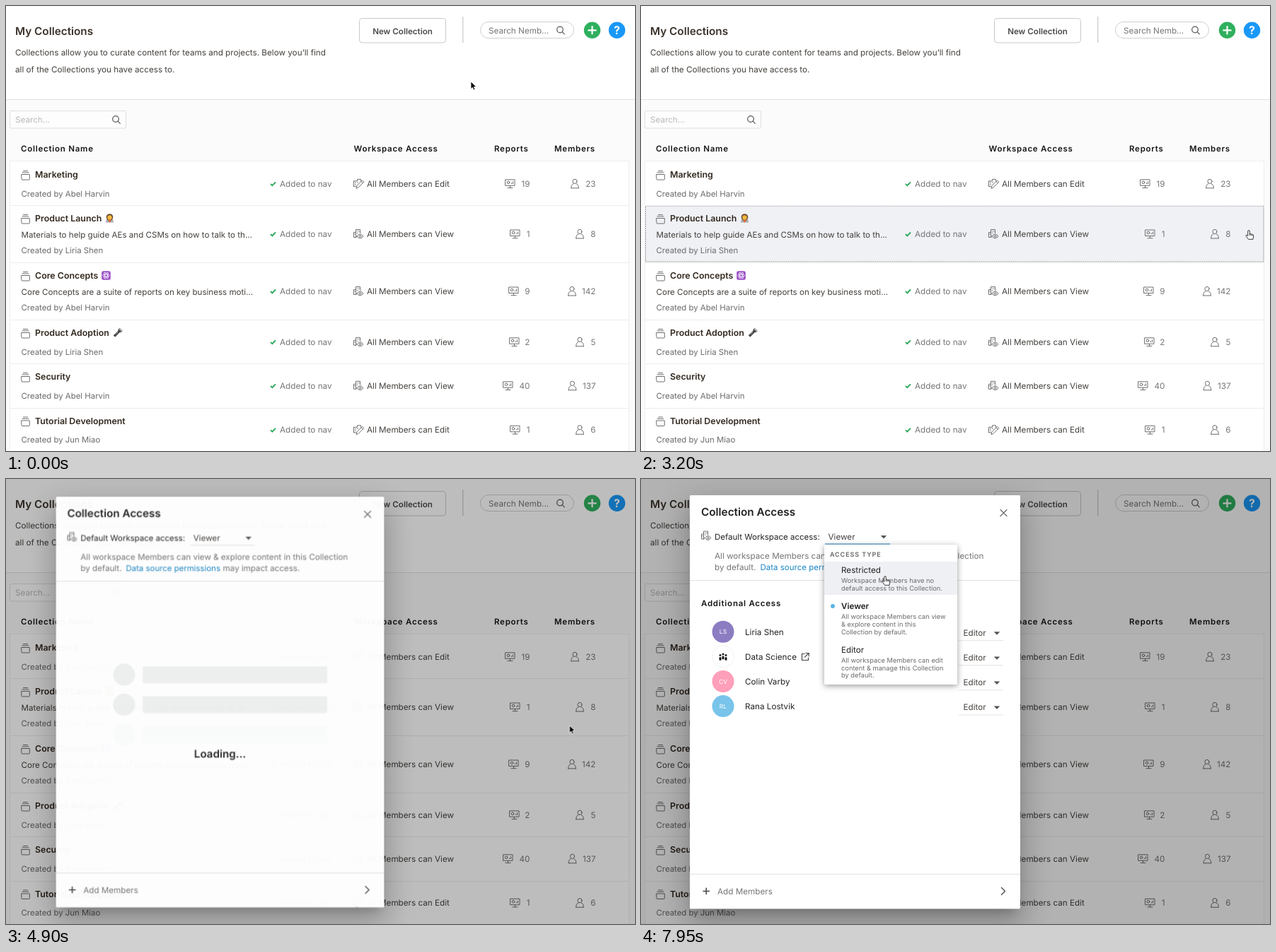
Recreate the animation shown at these times as an HTML page. Size 889 by 630 pixels, loop 8000 ms.

```html
<!DOCTYPE html>
<html lang="en">
<head>
<meta charset="utf-8">
<title>My Collections</title>
<style>
html, body { margin: 0; width: 100%; height: 100%; overflow: hidden; background: #fff; }
svg { display: block; width: 100vw; height: 100vh; }
text { font: 11.7px Inter, "Open Sans", sans-serif; fill: #45413d; text-rendering: geometricPrecision; }
.h1 { font-size: 15.3px; font-weight: 600; fill: #3b332b; }
.title { font-size: 12.4px; font-weight: 600; fill: #33291f; }
.head { font-size: 11.5px; font-weight: 600; letter-spacing: .75px; fill: #151515; }
.btn { font-size: 11.6px; font-weight: 600; fill: #4a4a4a; }
.by { font-size: 11.4px; fill: #6b6b6b; }
.sum { font-size: 11.6px; }
.grey { fill: #757575; }
.soft { fill: #b9b9b9; }
.dark { fill: #222; }
.link { font-size: 11.5px; fill: #1b87c4; }
.note { font-size: 9.3px; fill: #6b6b6b; }
.mid { text-anchor: middle; }
.end { text-anchor: end; }
.line { fill: none; stroke: #6e6e6e; stroke-width: 1; stroke-linecap: round; stroke-linejoin: round; }
.rule { stroke: #e2e2e2; fill: none; }

#hover, #veil, #modal, #load, #list, #menu, #pick, #arrow, #hand, .bone { animation: 8s step-end infinite; }
#hover { opacity: 0; animation-name: hover; }
@keyframes hover { 38.125% { opacity: 1 } 42.5% { opacity: 0 } }
#veil { opacity: 0; animation-name: veil; }
@keyframes veil { 59.75% { opacity: .015 } 61.25% { opacity: .26 } 61.875% { opacity: .29 } 62.5%, 100% { opacity: .3 } }
#modal { opacity: 0; transform-origin: 302.5px 315.7px; animation-name: modal; }
@keyframes modal {
  59.75% { opacity: .14; transform: scale(.75) }
  61.25% { opacity: .97; transform: scale(.993) }
  61.875%, 100% { opacity: 1; transform: none }
}
#load { animation-name: load; }
@keyframes load { 64.375%, 100% { opacity: 0 } }
#list { opacity: 0; animation-name: list; }
@keyframes list { 64.375%, 100% { opacity: 1 } }
.b2 { opacity: 0; animation-name: bone2; }
@keyframes bone2 { 61.25%, 100% { opacity: 1 } }
.b3 { opacity: 0; animation-name: bone3; }
@keyframes bone3 { 61.25% { opacity: .25 } 61.875% { opacity: .6 } 62.5%, 100% { opacity: 1 } }
#menu { opacity: 0; animation-name: menu; }
@keyframes menu { 91.25% { opacity: .4 } 91.875% { opacity: .8 } 92.5%, 100% { opacity: 1 } }
#pick { opacity: 0; animation-name: pick; }
@keyframes pick { 97.5%, 100% { opacity: 1 } }
#arrow { animation-name: arrow; }
@keyframes arrow { 39.375% { opacity: 0 } 42.5% { opacity: 1 } 88.125%, 100% { opacity: 0 } }
#hand { opacity: 0; animation-name: hand; }
@keyframes hand { 39.375% { opacity: 1 } 42.5% { opacity: 0 } 88.125%, 100% { opacity: 1 } }

/* The pointer advances in 50 ms ticks. */
#pointer { animation: move 8s step-end infinite; }
@keyframes move {
  0% { transform: translate(657px, 107px); animation-timing-function: steps(2) }
  1.5% { transform: translate(656px, 108px) }
  9.375% { transform: translate(656px, 108px); animation-timing-function: steps(14) }
  18.125% { transform: translate(804px, 171px); animation-timing-function: steps(3) }
  20% { transform: translate(818px, 186px); animation-timing-function: steps(17) }
  30.625% { transform: translate(826px, 200px); animation-timing-function: steps(7) }
  35% { transform: translate(842px, 205px) }
  36.875% { transform: translate(842px, 205px); animation-timing-function: steps(5) }
  40% { transform: translate(859px, 318px) }
  41.875% { transform: translate(860px, 321px) }
  46.875% { transform: translate(860px, 321px); animation-timing-function: steps(11) }
  53.75% { transform: translate(796.5px, 349px) }
  71.25% { transform: translate(796.5px, 349px); animation-timing-function: steps(6) }
  75% { transform: translate(649px, 216px); animation-timing-function: steps(2) }
  76.875% { transform: translate(600px, 185px) }
  80% { transform: translate(600px, 185px); animation-timing-function: steps(14) }
  88.75% { transform: translate(322px, 79px) }
  95% { transform: translate(322px, 79px); animation-timing-function: steps(7) }
  99.375%, 100% { transform: translate(345px, 138px) }
}
</style>
</head>
<body>
<svg viewBox="0 0 889 630" xmlns="http://www.w3.org/2000/svg">
  <defs>
    <g id="stack" class="line"><path d="M3.5 .5h6M2 2.8h9M1 5.500h11.300v6.800q0 .7-.7.700H1.700q-.7 0-.7-.7z"/></g>
    <g id="edit" class="line"><path d="M1 11V3.500h5V1h5v2M3 5.500h1M6 5.500h1M3 8h1M1 11h3"/><path d="M4.500 13.500l1-3.500 7.500-7.500 2.300 2.300-7.500 7.500zM11.500 4l2.300 2.300"/></g>
    <g id="view" class="line"><path d="M4.500 12H1V5h3V1h6v5M4 5v7M6 3.500h.5M8 3.500h.5M6 6h.5M2.200 7.500h.4"/><path d="M5.500 10.500q4.500-6 9 0q-4.500 6-9 0z"/><circle cx="10" cy="10.500" r="1.400"/></g>
    <g id="report" class="line"><path d="M1 1h13v8.500H1zM7.500 9.500v3M4 12.700h7M9.500 6.800v-1M11.500 6.800V4"/><circle cx="5" cy="5" r="1.800"/></g>
    <g id="person" class="line"><circle cx="6" cy="4" r="3.100"/><path d="M.7 13.500q0-5.500 3-6M11.300 13.500q0-5.500-3-6M.7 13.500h10.600"/></g>
    <g id="lens" class="line" style="stroke:#555;stroke-width:1.200"><circle r="4.300"/><path d="M3.200 3.200L6.300 6.300"/></g>
    <path id="tick" d="M.5 3l2.300 2.300L7.500 .5" fill="none" stroke="#2aa85a" stroke-width="1.900"/>
    <path id="caret" d="M-4.200-2h8.400L0 2.400z" fill="#555"/>
  </defs>

  <rect width="889" height="630" fill="#fff"/>
  <rect y="132" width="889" height="498" fill="#fbfbfb"/>
  <path class="rule" d="M0 132.500H889"/>
  <text class="h1" x="13" y="40.500">My Collections</text>
  <text x="13" y="70">Collections allow you to curate content for teams and projects. Below you’ll find</text>
  <text x="13" y="93.500">all of the Collections you have access to.</text>
  <rect x="499.500" y="17.500" width="122" height="34.500" rx="4" fill="#fff" stroke="#c9c9c9"/>
  <text class="btn mid" x="560.500" y="39.500">New Collection</text>
  <path d="M645.700 15V52" stroke="#d2d2d2" stroke-width="1.500"/>
  <rect x="670.500" y="22.500" width="132" height="23" rx="11.500" fill="#fff" stroke="#cfcfcf"/>
  <text class="grey" x="682" y="39">Search Nemb...</text>
  <use href="#lens" x="783" y="33.500"/>
  <circle cx="828.500" cy="34.300" r="11.700" fill="#2fb05e"/>
  <path d="M822.500 34.300h12M828.500 28.300v12" stroke="#fff" stroke-width="2.200"/>
  <circle cx="863.500" cy="34.300" r="11.700" fill="#1a98f7"/>
  <text class="mid" x="863.500" y="40" style="font-size:16px;font-weight:700;fill:#fff">?</text>

  <rect x="5.500" y="148.500" width="164" height="24.500" rx="2" fill="#fdfdfd" stroke="#dedede"/>
  <text class="soft" x="13" y="165">Search...</text>
  <use href="#lens" x="155" y="160"/>
  <text class="head" x="21" y="205.500">Collection Name</text>
  <text class="head" x="491.500" y="205.500">Workspace Access</text>
  <text class="head" x="690" y="205.500">Reports</text>
  <text class="head" x="775" y="205.500">Members</text>
  <rect x="5.500" y="219.500" width="875" height="420" fill="#fff" stroke="#eee"/>
  <g id="hover"><rect x="6.500" y="283" width="873.500" height="79" fill="#eff1f5" stroke="#999" stroke-dasharray="2 1"/></g>
  <g id="rows"></g>

  <!-- small picture marks beside the names -->
  <g transform="translate(146.500 300.500)">
    <path d="M-5.500 6q0-6 5.500-6t5.500 6z" fill="#a9adb2"/><circle cy="-1.500" r="4.800" fill="#6b4a35"/>
    <circle cy="-1" r="3.200" fill="#f5b93c"/><path d="M-1.500 2.500h3v3h-3z" fill="#e2683c"/>
  </g>
  <g transform="translate(141.500 381.500)">
    <rect x="-6.300" y="-6.300" width="12.600" height="12.600" rx="2.500" fill="#9b4fc4"/>
    <g fill="none" stroke="#fff" stroke-width=".8"><ellipse rx="4.800" ry="1.800"/><ellipse rx="4.800" ry="1.800" transform="rotate(60)"/><ellipse rx="4.800" ry="1.800" transform="rotate(120)"/></g>
  </g>
  <g transform="translate(158 462.500) rotate(-45)">
    <path d="M-7-1.700H2L4-3H6.500V3H4L2 1.700H-7z" fill="#45474a"/><path d="M4.500-3H6.500V3H4.500z" fill="#a8a8a8"/><path d="M-4-.6H1" stroke="#8c8c8c"/>
  </g>

  <rect id="veil" width="889" height="630" fill="#000"/>

  <g id="modal">
    <!-- layered elevation shadow -->
    <rect x="76" y="41" width="453" height="571.500" style="filter:blur(7.5px);opacity:.2"/>
    <rect x="66" y="44" width="473" height="591.500" style="filter:blur(19px);opacity:.14"/>
    <rect x="61" y="24" width="483" height="601.500" style="filter:blur(23px);opacity:.12"/>
    <rect x="69" y="23" width="467" height="585.500" rx="1.500" fill="#fff"/>
    <text class="h1 dark" x="85" y="52">Collection Access</text>
    <path class="line" style="stroke-width:1.300" d="M508 43.500l9 9M517 43.500l-9 9"/>
    <use href="#view" x="84.500" y="73"/>
    <text class="dark" x="104" y="85.500" style="font-size:11.500px">Default Workspace access:</text>
    <text x="264.500" y="85.500">Viewer</text>
    <use href="#caret" x="343" y="82"/>
    <path class="rule" d="M260 92H352"/>
    <text class="grey" x="104" y="112.500">All workspace Members can view &amp; explore content in this Collection</text>
    <text class="grey" x="104" y="128.500">by default.</text>
    <text class="link" x="168.500" y="128.500">Data source permissions</text>
    <text class="grey" x="306.500" y="128.500">may impact access.</text>
    <path class="rule" d="M69 143.500H536M69 559.500H536"/>
    <path class="line" style="stroke:#444;stroke-width:1.500" d="M88 583.500h8.500M92.200 579.300v8.500"/>
    <text class="grey" x="108" y="588">Add Members</text>
    <path class="line" style="stroke:#555;stroke-width:1.500" d="M509.500 578.500l5 5-5 5"/>
    <g id="load"></g>
    <g id="list"></g>
  </g>

  <g id="menu">
    <path d="M260 92H352" stroke="#2a96d0"/>
    <rect x="259" y="93" width="188" height="198" rx="2" fill="#fff" style="filter:drop-shadow(0 2px 4px rgba(0,0,0,.4))"/>
    <rect id="pick" x="259" y="117" width="188" height="47" fill="#eff0f4"/>
    <text x="267" y="110.300" style="font-size:9px;font-weight:600;letter-spacing:.9px;fill:#666">ACCESS TYPE</text>
    <circle cx="271" cy="180" r="2.900" fill="#58b5e2"/>
  </g>

  <g id="pointer">
    <path id="arrow" d="M0 0V10.500L2.400 8.300 4 12 5.900 11.200 4.300 7.600 7.500 7.300z" fill="#000" stroke="#fff" stroke-width=".8"/>
    <path id="hand" d="M-1.300 1a1.300 1.300 0 0 1 2.600 0V4.500Q3 3.900 3.200 5Q5 4.500 5.200 5.700Q6.900 5.500 6.800 7.500L6 12.300H-.5L-4 7.500Q-4.100 5.900-2.700 6.300L-1.300 7.700zM1.300 4.500V7M3.200 5V7.200M5.200 5.700V7.400" fill="#fff" stroke="#222" stroke-width=".9" stroke-linejoin="round"/>
  </g>
</svg>
<script>
const $ = id => document.getElementById(id);
const text = (x, y, s, cls = '') => `<text x="${x}" y="${y}" class="${cls}">${s}</text>`;
const icon = (id, x, y) => `<use href="#${id}" x="${x}" y="${y}"/>`;

// top, name, author, access, reports, report icon x, members, member icon x, summary
const rows = [
  [220.5, 'Marketing', 'Abel Harvin', 'Edit', 19, 705, 23, 798],
  [282.5, 'Product Launch', 'Liria Shen', 'View', 1, 712, 8, 805, 'Materials to help guide AEs and CSMs on how to talk to th...'],
  [363.5, 'Core Concepts', 'Abel Harvin', 'View', 9, 710, 142, 794, 'Core Concepts are a suite of reports on key business moti...'],
  [444.5, 'Product Adoption', 'Liria Shen', 'View', 2, 711, 5, 805],
  [506.5, 'Security', 'Abel Harvin', 'View', 40, 702, 137, 794.5],
  [569, 'Tutorial Development', 'Jun Miao', 'Edit', 1, 712, 6, 805]
];
$('rows').innerHTML = rows.map(([y, name, author, access, reports, rx, members, mx, summary]) => {
  const mid = y + (summary ? 44.5 : 35.3);
  return (y > 221 ? `<path d="M6 ${Math.floor(y) + .5}H880" stroke="#ededed"/>` : '') +
    icon('stack', 21, y + 12.5) + text(41, y + 22.5, name, 'title') +
    (summary ? text(21.5, y + 45, summary, 'sum') : '') +
    text(21.5, y + (summary ? 67.5 : 49), 'Created by ' + author, 'by') +
    icon('tick', 373.5, mid - 7) + text(387, mid, 'Added to nav', 'grey') +
    icon(access.toLowerCase(), 490.5, mid - 11.5) + text(510, mid, 'All Members can ' + access) +
    icon('report', rx, mid - 11) + text(740.5, mid, reports, 'grey end') +
    icon('person', mx, mid - 11.5) + text(833.5, mid, members, 'grey end');
}).join('');

$('load').innerHTML = [1, 2, 3].map(n => {
  const y = 234 + n * 42.7;
  return `<g class="bone b${n}" fill="#eff1f1"><circle cx="166" cy="${y}" r="15.6"/>
    <rect x="192.5" y="${y - 12}" width="262.5" height="24" rx="2"/></g>`;
}).join('') + text(302.5, 394.5, 'Loading...', 'h1 dark mid');

const people = [['Liria Shen', 'LS', '#8c7dc2'], ['Data Science', '', '#fff'], ['Colin Varby', 'CV', '#ff9fb9'], ['Rana Lostvik', 'RL', '#78c4ea']];
const group = [-4, 0, 4].map(x => `<circle cx="${116 + x}" cy="${x ? 249.5 : 248}" r="1.7"/>
  <rect x="${114.3 + x}" y="${x ? 252 : 250.5}" width="3.4" height="5" rx="1.3"/>`).join('');
$('list').innerHTML = text(85, 179.5, 'Additional Access', 'head') + people.map(([name, tag, color], i) => {
  const y = 216.3 + i * 35.1;
  return `<circle cx="116" cy="${y}" r="15.5" fill="${color}" stroke="${tag ? 'none' : '#f1f1f1'}"/>` +
    `<text x="116" y="${y + 3}" class="mid" style="font-size:8.5px;fill:#fff">${tag}</text>` +
    text(147, y + 4.3, name, 'dark') + text(455.5, y + 5.3, 'Editor') + icon('caret', 503, y + 2) +
    `<path class="rule" d="M449 ${y + 12.4}H512"/>`;
}).join('') + `<g fill="#111" stroke="#fff" stroke-width=".5">${group}</g>
  <path class="line" style="stroke:#444;stroke-width:1.2" d="M231 247.5h-3.500v9h9v-3.500M233 246.500h4.200v4.200M237 246.700l-5.500 5.500"/>`;

const options = [
  [133, 'Restricted', 'Workspace Members have no', 'default access to this Collection.'],
  [184, 'Viewer', 'All workspace Members can view', '&amp; explore content in this', 'Collection by default.'],
  [245.5, 'Editor', 'All workspace Members can edit', 'content &amp; manage this Collection', 'by default.']
];
$('menu').insertAdjacentHTML('beforeend', options.map(([y, name, ...lines]) =>
  text(283, y, name, name === 'Viewer' ? 'btn dark' : 'dark') +
  lines.map((s, i) => text(283, y + 14.3 + i * 10.7, s, 'note')).join('')).join(''));
</script>
</body>
</html>
```
